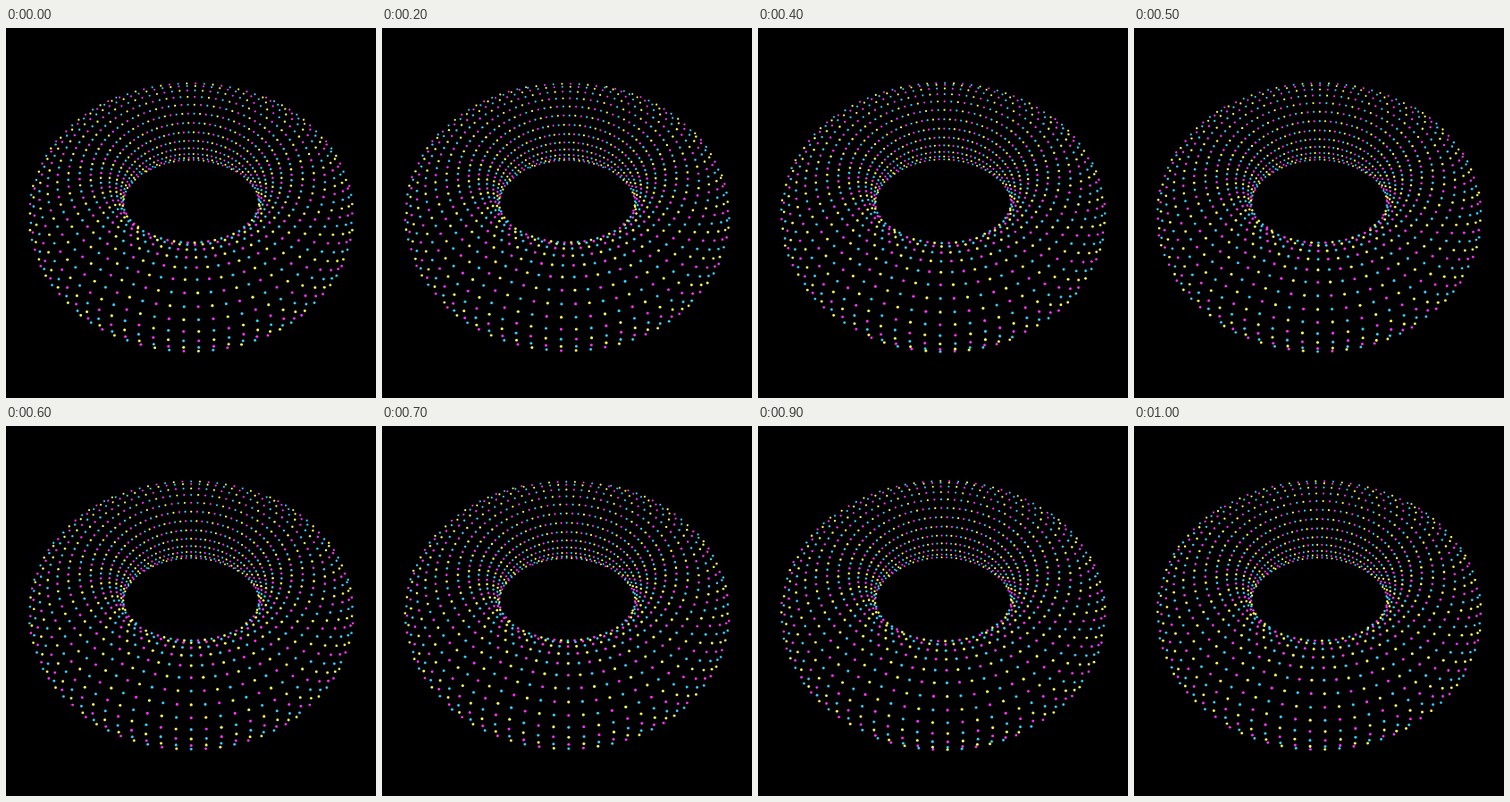
An HTML page with a canvas for the animation above (1100 ms loop, 414x414 px).

```html
<!DOCTYPE html>
<html lang="en">
<head>
<meta charset="utf-8">
<title>Dotted torus</title>
<style>
html, body { margin: 0; width: 100%; height: 100%; overflow: hidden; background: #000; }
canvas { display: block; width: 414px; height: 414px; }
</style>
</head>
<body>
<canvas id="stage" width="414" height="414"></canvas>
<script>
const ctx = document.getElementById('stage').getContext('2d');
const TAU = Math.PI * 2;
const COLORS = ['#3cf', '#f3f', '#ff5'];
const COLS = 84, ROWS = 28;
const TUBE = 0.395, DOT = 0.0095;
const DIST = 4, FOCAL = 501, CX = 207.2, CY = 186.5;
const SIN = 0.755, COS = Math.sqrt(1 - SIN * SIN);
const STEP = 100, STEPS = 11;

// Camera space: x right, v up, w towards the viewer.
const view = (x, y, z) => [x, z * COS - y * SIN, y * COS + z * SIN];

function drawDot(theta, psi, color) {
  const st = Math.sin(theta), ct = Math.cos(theta);
  const sp = Math.sin(psi), cp = Math.cos(psi);
  const ring = 1 + TUBE * cp;
  const [x, v, w] = view(ring * st, ring * ct, TUBE * sp);
  const [nx, nv, nw] = view(cp * st, cp * ct, sp);
  const depth = DIST - w;
  const facesViewer = nw * depth - nx * x - nv * v > 0;
  if (!facesViewer) return;

  const scale = FOCAL / depth;
  ctx.fillStyle = color;
  ctx.beginPath();
  ctx.arc(CX + x * scale, CY - v * scale, DOT * scale, 0, TAU);
  ctx.fill();
}

function draw(step) {
  // Each cycle carries every dot one column right and two rows up;
  // the loop opens on the end of a cycle.
  const phase = (step + STEPS - 1) % STEPS / (STEPS - 1);
  ctx.fillStyle = '#000';
  ctx.fillRect(0, 0, 414, 414);
  for (let i = 0; i < COLS; i++) {
    const theta = (i + 0.5 + phase) / COLS * TAU;
    // Rows start underneath, where the colour seam stays hidden.
    for (let j = -8; j < ROWS - 8; j++) {
      drawDot(theta, (j + 2 * phase) / ROWS * TAU, COLORS[(i + j + 9) % 3]);
    }
  }
}

let shown = -1;
function tick() {
  const step = Math.floor(performance.now() / STEP) % STEPS;
  if (step !== shown) draw(shown = step);
  requestAnimationFrame(tick);
}
tick();
</script>
</body>
</html>
```
